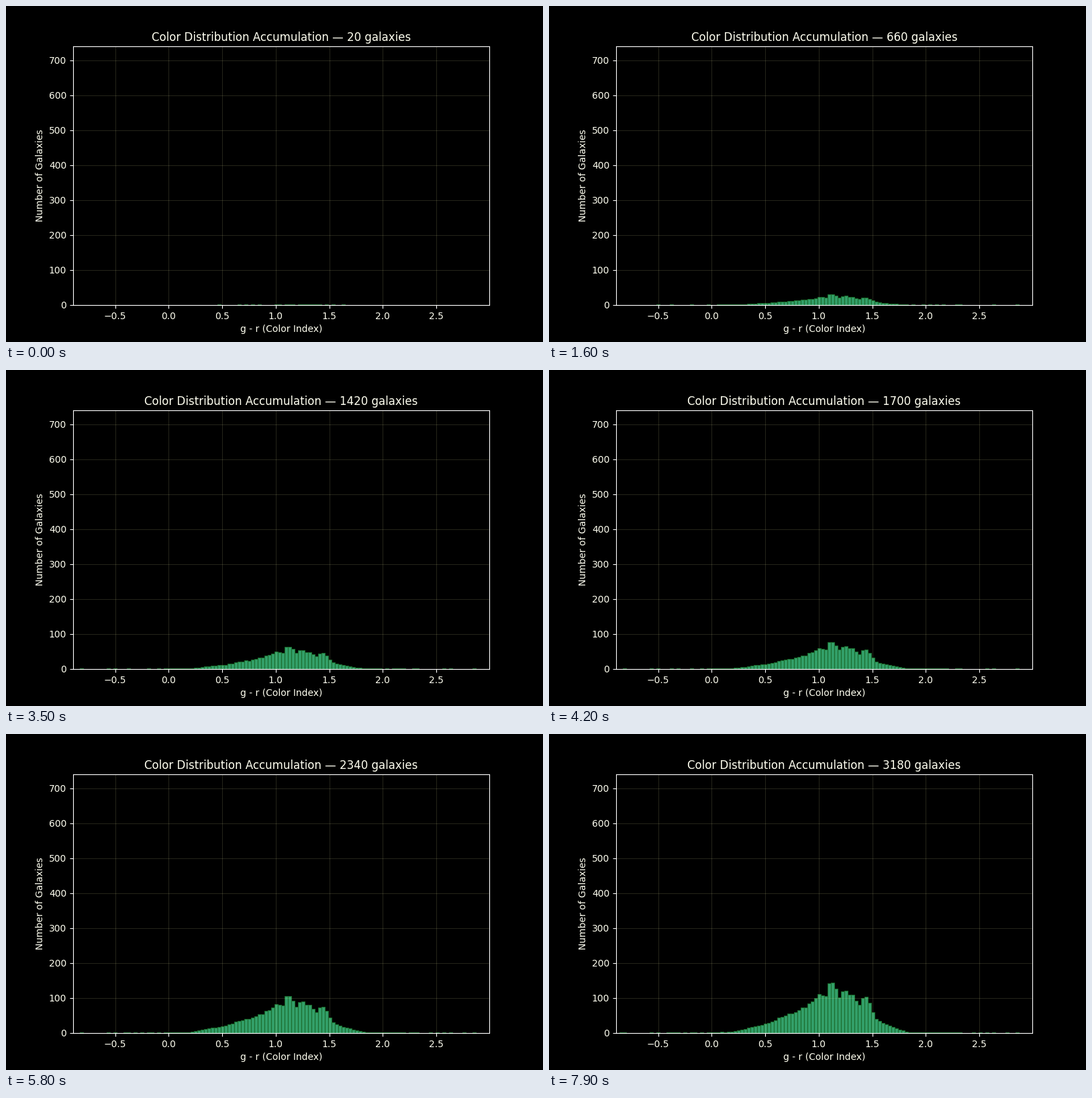
Recreate the animation shown at these times as a matplotlib script. Size 800 by 500 pixels, loop 8 s.

```python
import numpy as np
import matplotlib.pyplot as plt
from matplotlib.animation import FuncAnimation

FRAMES, INTERVAL = 80, 100
START, STEP = 20, 40
TOTAL = START + STEP * (FRAMES - 1)
BINS = 124
XMIN, XMAX, YMAX = -0.893, 2.995, 740
TEXT = "#fffff0"

# outline of the full histogram: (bin, galaxies)
OUTLINE = [(0, 0.1), (24, 0.4), (34, 3), (40, 17), (45, 29), (49, 47),
           (53, 60), (57, 82), (60, 109), (62, 103), (63, 142), (64, 144),
           (66, 106), (68, 124), (72, 83), (74, 104), (77, 41), (80, 25),
           (84, 9), (87, 2), (95, 0.8), (123, 0.1)]

rng = np.random.default_rng(4)
bins = np.arange(BINS)
full = np.interp(bins, *zip(*OUTLINE)) * (1 + 0.03 * rng.standard_normal(BINS))
phase = rng.random(BINS)


def counts(n):
    """Whole galaxies per bin; each bin fills steadily with its own offset."""
    return np.floor(full * n / TOTAL + phase) - np.floor(phase)


def first_arrivals(n):
    """Drop the offset's head start so that empty bins begin empty."""
    return np.where(full * n / TOTAL + phase >= 1, counts(n), 0)


plt.rcParams["font.family"] = "DejaVu Sans"
fig, ax = plt.subplots(figsize=(8, 5), dpi=100, facecolor="black")
ax.set_facecolor("black")
ax.set_xlim(XMIN, XMAX)
ax.set_ylim(0, YMAX)
ax.grid(color="#ffffb0", alpha=0.14, linewidth=0.8)
ax.tick_params(color="white", labelcolor=TEXT)
for spine in ax.spines.values():
    spine.set_color("white")
ax.set_xlabel("g - r (Color Index)", color=TEXT)
ax.set_ylabel("Number of Galaxies", color=TEXT)
title = ax.set_title("", color=TEXT)

width = (XMAX - XMIN) / BINS
bars = ax.bar(XMIN + bins * width, np.zeros(BINS), width=width, align="edge",
              color="#33a06a", edgecolor="#1c6b2e", linewidth=0.8)


def update(i):
    n = START + STEP * i
    for bar, h in zip(bars, first_arrivals(n)):
        bar.set_height(h)
        bar.set_visible(h > 0)
    title.set_text(f"Color Distribution Accumulation — {n} galaxies")
    return [title, *bars]


anim = FuncAnimation(fig, update, frames=FRAMES, interval=INTERVAL,
                     repeat=True, repeat_delay=0, blit=False)
plt.show()
```
